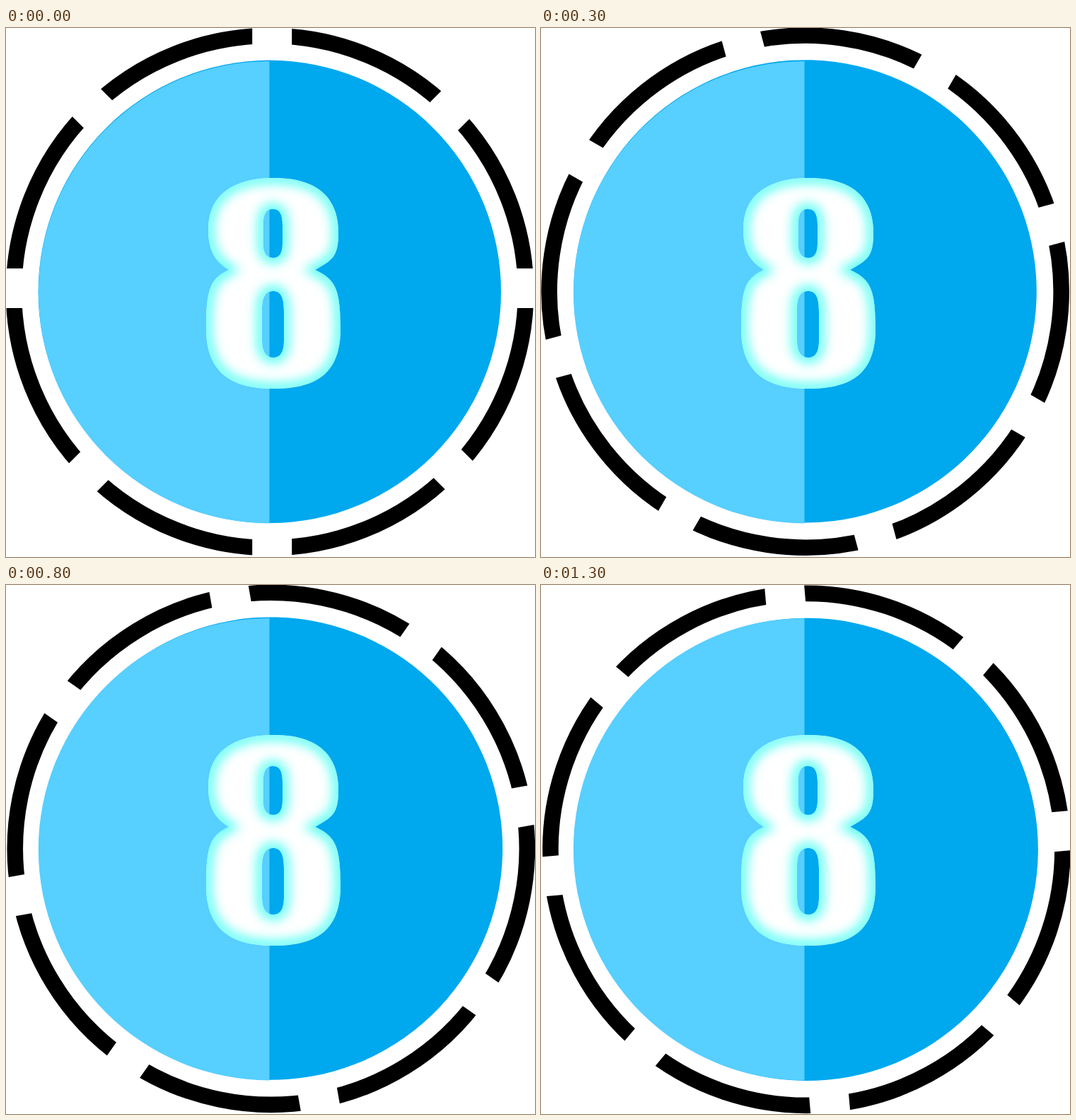
These frames come from a looping animation (748x748 px, 1400 ms). An HTML page:

```html
<!DOCTYPE html>
<html lang="en">
<head>
<meta charset="utf-8">
<title>Countdown dial</title>
<style>
  html, body { margin: 0; width: 100%; height: 100%; overflow: hidden; background: #fff; }
  svg { display: block; width: 100vw; height: 100vh; }
</style>
</head>
<body>
<svg viewBox="0 0 748 748" role="img" aria-label="8">
  <defs>
    <path id="eight" d="M378 212C441 212 470 240 470 290C470 323 462 328 437 342
      C465 355 473 368 473 425C473 488 440 510 378 510C315 510 283 484 283 425
      C283 367 290 354 315 342C293 328 286 312 286 284C286 236 322 212 378 212Z
      M377 256C368 256 363.500 263 363.500 279V304C363.500 318 368 325 378 325
      C387 325 391 318 391 304V279C391 263 387 256 377 256Z
      M378 372C367 372 362 380 362 399V442C362 458 368 466 378 466
      C388 466 393 458 393 442V401C393 380 388 372 378 372Z"/>
    <clipPath id="inside"><use href="#eight" clip-rule="evenodd"/></clipPath>
    <filter id="soft" filterUnits="userSpaceOnUse" x="240" y="170" width="280" height="380"
      color-interpolation-filters="sRGB"><feGaussianBlur stdDeviation="8"/></filter>
  </defs>
  <rect width="748" height="748" fill="#fff"/>
  <!-- ring, gaps and disc sit slightly off the pivot, so they wobble as they turn -->
  <g id="dial">
    <circle cx="373" cy="373" r="362" fill="none" stroke="#000" stroke-width="22.600"/>
    <g id="gaps" transform="translate(376.2 368)" stroke="#fff" stroke-width="56"></g>
    <circle cx="372.800" cy="372.800" r="327.200" fill="#00a8ee"/>
  </g>
  <path d="M372.500 47A326.700 326.700 0 0 0 372.500 700.400Z" fill="#57cfff"/>
  <g clip-path="url(#inside)">
    <rect x="270" y="200" width="220" height="320" fill="#fff"/>
    <use href="#eight" fill="none" stroke="#5efff4" stroke-width="16" filter="url(#soft)"/>
  </g>
</svg>
<script>
  const LOOP = 1400, STEP = 100, TURN = 10;
  const dial = document.getElementById('dial');

  document.getElementById('gaps').innerHTML = [0, 45, 90, 135]
    .map(a => `<path d="M0-400V400" transform="rotate(${a})"/>`).join('');

  function draw() {
    const step = Math.floor(performance.now() % LOOP / STEP);
    dial.setAttribute('transform', `rotate(${step * TURN} 374 374)`);
    requestAnimationFrame(draw);
  }
  draw();
</script>
</body>
</html>
```
